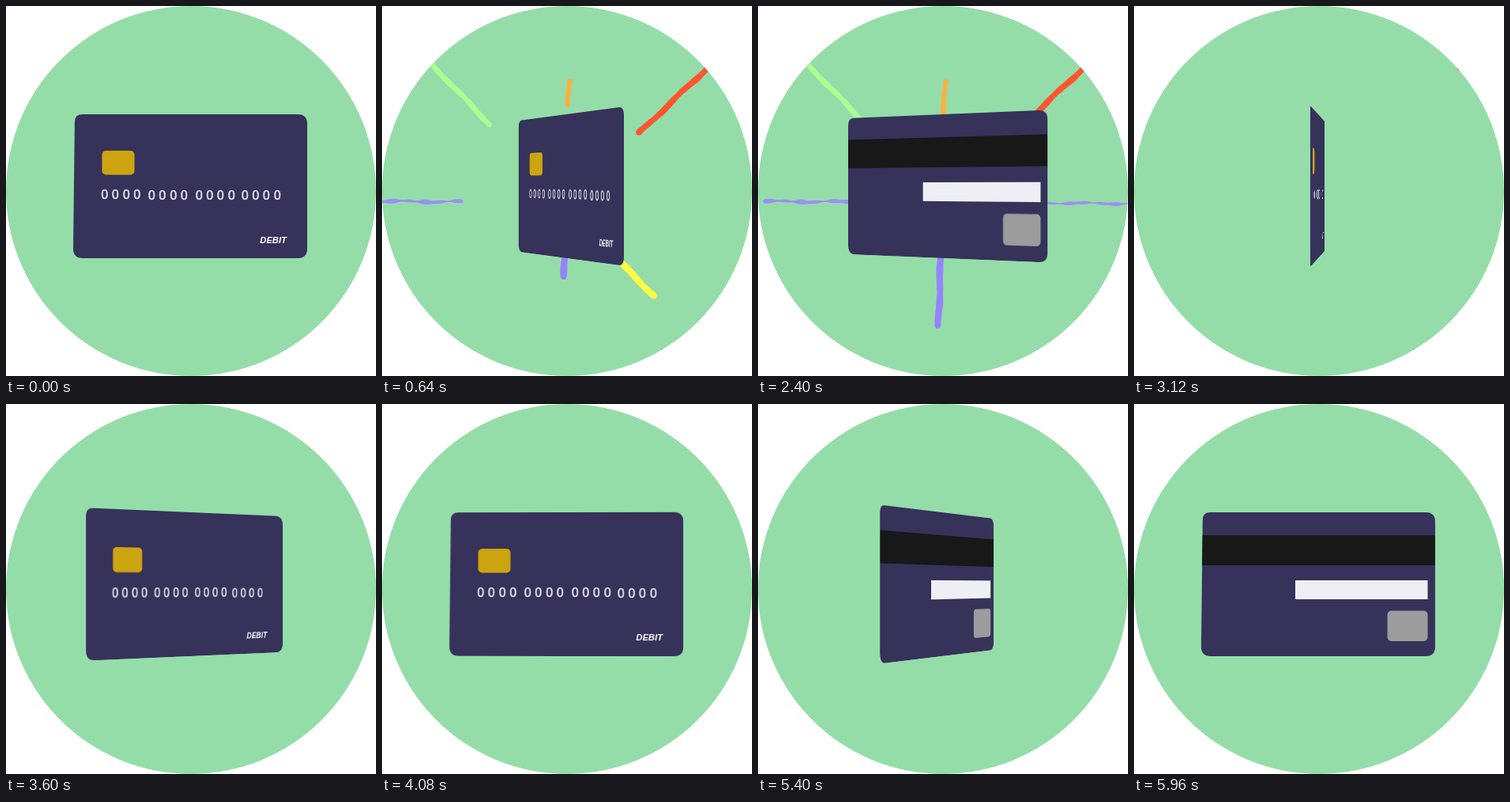
An HTML page with a canvas for the animation above (6000 ms loop, 468 by 468 pixels).

```html
<!DOCTYPE html>
<html lang="en">
<head>
<meta charset="utf-8">
<title>Turning debit card</title>
<style>
  html, body { margin: 0; width: 100%; height: 100%; overflow: hidden; background: #fff; }
  #stage { position: relative; width: 468px; height: 468px; overflow: hidden;
           perspective: 1358px; perspective-origin: 232.5px 228px; }
  #rays { position: absolute; left: 0; top: 0; }
  #card { position: absolute; left: 84.5px; top: 137px; width: 296px; height: 182px;
          transform-style: preserve-3d; }
  .face { position: absolute; inset: 0; backface-visibility: hidden; }
  .back { transform: rotateY(180deg); }
  svg { display: block; overflow: visible; }
  .body { fill: #36325a; }
  .digits { font: 15px "DejaVu Sans", sans-serif; fill: #dcd9e6; stroke: #dcd9e6; stroke-width: .6; }
  .kind { font: italic bold 11.2px "Liberation Sans", Arial, sans-serif; fill: #fff; }
</style>
</head>
<body>
<div id="stage">
  <canvas id="rays" width="468" height="468"></canvas>
  <div id="card">
    <div class="face">
      <svg width="296" height="182">
        <path class="body"/>
        <rect x="36.5" y="46" width="41" height="30.5" rx="5" fill="#cca40f"/>
        <g class="digits">
          <text x="35 48.5 62.5 76" y="107">0000</text>
          <text x="94.5 108 122 135.5" y="107.5">0000</text>
          <text x="154.5 168 181.5 195.5" y="107.5">0000</text>
          <text x="212.5 226 239.5 253.5" y="108">0000</text>
        </g>
        <text class="kind" x="236.3" y="162.5">DEBIT</text>
      </svg>
    </div>
    <div class="face back">
      <svg width="296" height="182">
        <path class="body"/>
        <path class="stripe" fill="#181818"/>
        <rect x="119" y="86" width="167.5" height="24" fill="#eeeff5"/>
        <rect x="235.5" y="124.5" width="51" height="38.5" rx="5" fill="#9c9c9c"/>
      </svg>
    </div>
  </div>
</div>
<script>
const LOOP = 6000;
const QUARTERS = [0, 1000, 2000, 3000, 4020, 5050, 5980];
const BURSTS = [0, 2000, 4020];

// from x, y, to x, y, width, roughness, colour, grow start/end, erase start/end
const RAYS = [
  [150, 164, 60, 71, 7, .15, '#adfd90', 180, 400, 620, 1140],
  [310, 175, 412, 78, 8, .2, '#ff5530', 180, 400, 620, 1140],
  [161, 248, -4, 247, 6, .7, '#9c8ff8', 180, 420, 600, 980],
  [350, 249, 474, 250, 5, .7, '#9c8ff8', 180, 400, 420, 820],
  [233, 164, 237, 95, 7, .2, '#fcb040', 200, 400, 620, 730],
  [228, 404, 232, 300, 9, .15, '#9583ff', 180, 400, 570, 920],
  [297, 320, 396, 418, 9, .2, '#fbfb46', 565, 725, 745, 1000]
];

const stage = document.getElementById('rays').getContext('2d');
const card = document.getElementById('card');
const bodies = document.querySelectorAll('.body');
const stripe = document.querySelector('.stripe');

const part = (t, a, b) => Math.min(1, Math.max(0, (t - a) / (b - a)));
const smooth = p => p * p * (3 - 2 * p);

function angleAt(t) {
  let turns = 0;
  for (let i = 1; i < QUARTERS.length; i++) turns += smooth(part(t, QUARTERS[i - 1], QUARTERS[i]));
  return turns * 90;
}

function drawRay([x1, y1, x2, y2, w, rough, color, g0, g1, e0, e1], t) {
  if (t <= g0 || t >= e1) return;
  const head = part(t, g0, g1);
  const tail = 1 - (1 - part(t, e0, e1)) ** 4;
  const len = Math.hypot(x2 - x1, y2 - y1);
  const nx = (y1 - y2) / len, ny = (x2 - x1) / len;
  stage.fillStyle = color;
  stage.beginPath();
  for (let s = tail * len; s <= head * len; s += .7) {
    const wave = .6 * Math.sin(s * .13 + x1) + .4 * Math.sin(s * .31 + y1);
    const r = w / 2 * (1 - rough * (.5 + .5 * wave));
    const off = .8 * Math.sin(s * .09 + y2);
    const x = x1 + (x2 - x1) * s / len + nx * off;
    const y = y1 + (y2 - y1) * s / len + ny * off;
    stage.moveTo(x + r, y);
    stage.arc(x, y, r, 0, 7);
  }
  stage.fill();
}

function drawBackdrop(t) {
  stage.clearRect(0, 0, 468, 468);
  stage.save();
  stage.beginPath();
  stage.arc(234, 234, 234, 0, 7);
  stage.fillStyle = '#94dda9';
  stage.fill();
  stage.clip();
  const start = BURSTS.filter(b => b <= t).pop();
  RAYS.forEach(ray => drawRay(ray, t - start));
  stage.restore();
}

function drawCard(t) {
  const angle = angleAt(t);
  const tilt = Math.abs(Math.sin(angle * Math.PI / 180));
  // the left side leans a little while the card lies flat
  const lean = 2 * Math.max(0, 1 - tilt * 4);
  const left = y => lean * (1 - y / 182);
  const shape = `M${left(9)} 9Q${lean} 0 ${lean + 10} 0H284Q296 0 296 12V170Q296 182 284 182H12Q0 182 0 170Z`;
  bodies.forEach(b => b.setAttribute('d', shape));
  stripe.setAttribute('d', `M${left(29)} 29H296V67H${left(67)}Z`);
  card.style.transform = `rotateY(${-angle}deg)`;
}

function frame() {
  const t = performance.now() % LOOP;
  drawBackdrop(t);
  drawCard(t);
  requestAnimationFrame(frame);
}
frame();
</script>
</body>
</html>
```
